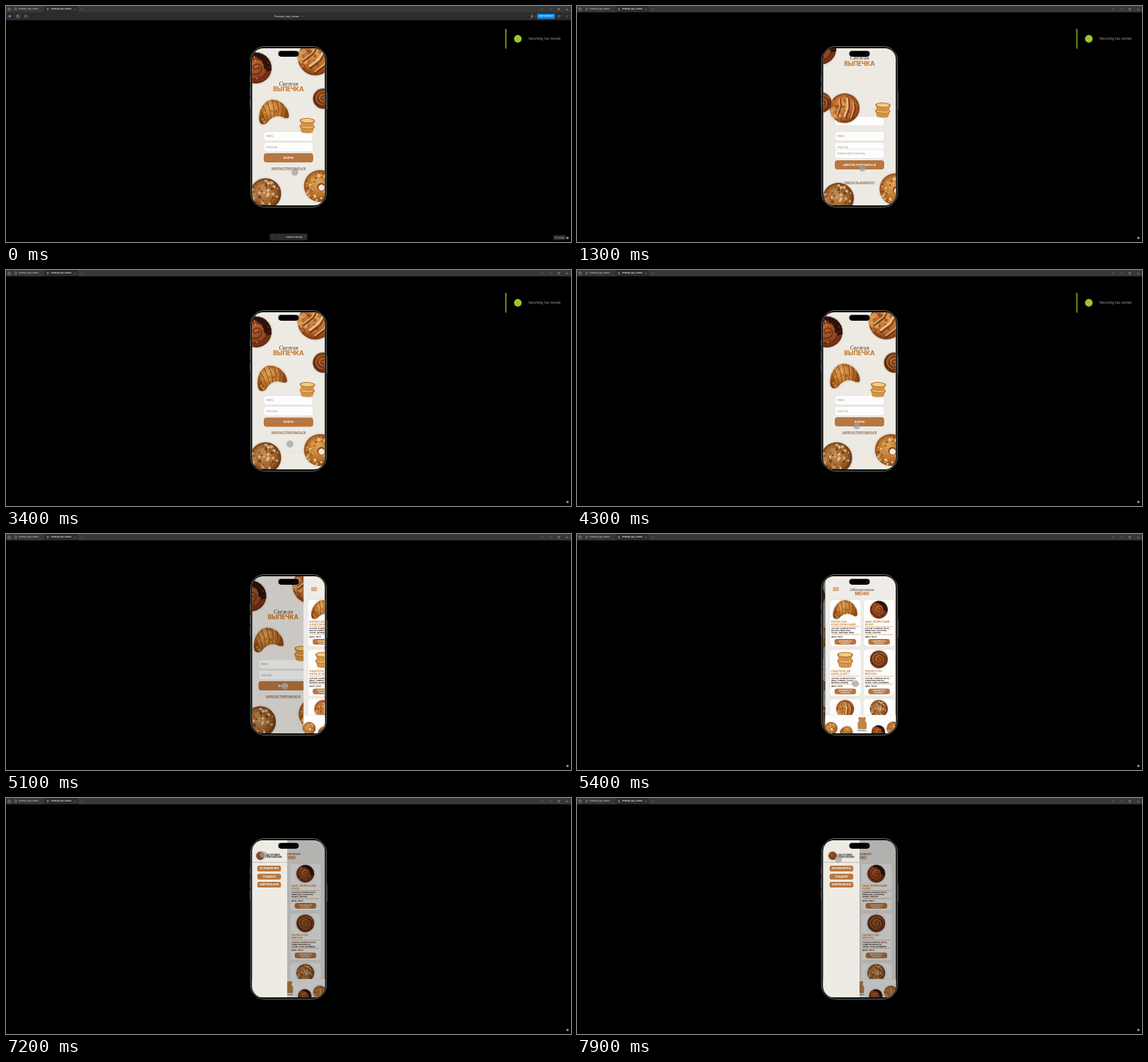
Recreate the animation shown at these times as an HTML page with a canvas. Size 800 px wide and 335 px high, loop 8000 ms.

```html
<!DOCTYPE html>
<html lang="ru">
<head>
<meta charset="utf-8">
<title>Bakery app prototype</title>
<style>
html, body { margin: 0; width: 100%; height: 100%; overflow: hidden; background: #000; }
canvas { display: block; width: 800px; height: 335px; }
</style>
</head>
<body>
<canvas id="stage" width="800" height="335"></canvas>
<script>
const ctx = document.getElementById('stage').getContext('2d');
const LOOP = 8000, TAU = Math.PI * 2;
const ORANGE = '#c67a2f', BUTTON = '#b87640', CREAM = '#edeae4', INK = '#2b211c';
const clamp = v => Math.max(0, Math.min(1, v));
const mix = (a, b, k) => a + (b - a) * k;
const settle = (elapsed, tau) => elapsed <= 0 ? 0 : 1 - Math.exp(-elapsed / tau);
const noise = n => { const v = Math.sin(n * 127.1) * 43758.5453; return v - Math.floor(v); };

function layer(draw, { x = 0, y = 0, scale = 1, turn = 0, alpha = 1 } = {}) {
  if (alpha <= 0) return;
  ctx.save();
  ctx.translate(x, y);
  ctx.rotate(turn);
  ctx.scale(scale, scale);
  ctx.globalAlpha *= alpha;
  draw();
  ctx.restore();
}

function box(x, y, w, h, r, fill, stroke, width = 0.6) {
  ctx.beginPath();
  ctx.roundRect(x, y, w, h, r);
  if (fill) { ctx.fillStyle = fill; ctx.fill(); }
  if (stroke) { ctx.strokeStyle = stroke; ctx.lineWidth = width; ctx.stroke(); }
}

function dot(x, y, r, fill) {
  ctx.beginPath();
  ctx.arc(x, y, r, 0, TAU);
  ctx.fillStyle = fill;
  ctx.fill();
}

function line(color, width, ...pts) {
  ctx.beginPath();
  for (let i = 0; i < pts.length; i += 2) ctx.lineTo(pts[i], pts[i + 1]);
  ctx.strokeStyle = color;
  ctx.lineWidth = width;
  ctx.stroke();
}

// Set at ten times the size and scaled down, so tiny type keeps its spacing.
function text(str, x, y, size, color, { weight = 400, align = 'left', style = '', family = 'Inter, sans-serif' } = {}) {
  layer(() => {
    ctx.font = `${style} ${weight} ${size * 10}px ${family}`;
    ctx.textAlign = align;
    ctx.fillStyle = color;
    ctx.fillText(str, 0, size * 3.6);
  }, { x, y, scale: 0.1 });
}
const centered = (str, x, y, size, color, weight = 700) => text(str, x, y, size, color, { weight, align: 'center' });
const script = (str, x, y, size) =>
  text(str, x, y, size, '#4a3a32', { align: 'center', style: 'italic', family: '"Liberation Serif", serif' });

// Pastries are drawn around the origin with radius 1.
function glow(light, mid, dark) {
  const g = ctx.createRadialGradient(-0.2, -0.3, 0.1, 0, 0, 1.05);
  g.addColorStop(0, light);
  g.addColorStop(0.65, mid);
  g.addColorStop(1, dark);
  return g;
}

function disc(light, mid, dark) {
  ctx.save();
  ctx.shadowColor = 'rgba(70,35,5,.35)';
  ctx.shadowBlur = 3;
  dot(0, 0, 1, glow(light, mid, dark));
  ctx.restore();
}

function crumbs(count, colors, size, inner = 0) {
  for (let i = 0; i < count; i++) {
    const a = noise(i + 1) * TAU, d = inner + (0.92 - inner) * Math.sqrt(noise(i + 60));
    dot(Math.cos(a) * d, Math.sin(a) * d, size * (0.5 + noise(i + 9)), colors[i % colors.length]);
  }
}

function spiral(color, width, turns) {
  ctx.beginPath();
  for (let i = 0; i <= 80; i++) {
    const k = i / 80, a = k * turns * TAU;
    ctx.lineTo(Math.cos(a) * k * 0.9, Math.sin(a) * k * 0.85);
  }
  ctx.strokeStyle = color;
  ctx.lineWidth = width;
  ctx.stroke();
}

function roll() {
  disc('#b8622f', '#94441d', '#5a2410');
  spiral('rgba(70,24,10,.55)', 0.09, 2.6);
  for (let i = 0; i < 9; i++) {
    const a = -1.9 + i * 0.24, d = 0.5 + 0.25 * noise(i + 3);
    line('#2a120d', 0.2, Math.cos(a) * 0.98, Math.sin(a) * 0.98, Math.cos(a + 0.2) * d, Math.sin(a + 0.2) * d);
  }
  crumbs(16, ['#cf7d45', '#4a1d10'], 0.05);
}

function swirl() {
  disc('#b8682f', '#8e461a', '#55240d');
  spiral('#431b0b', 0.13, 2.8);
  layer(() => spiral('rgba(214,134,70,.7)', 0.07, 2.8), { turn: 0.8 });
}

function bread() {
  disc('#dc9a50', '#b8662a', '#74340f');
  crumbs(36, ['rgba(226,166,98,.7)', 'rgba(128,60,18,.6)', 'rgba(192,112,50,.7)'], 0.11);
  for (const [x, w] of [[-0.45, 0.06], [0.08, 0.13], [0.52, 0.06]]) {
    const top = Math.abs(x) * 0.4 - 0.75;
    line('rgba(100,44,12,.7)', w + 0.08, x, top, x + 0.18, -0.1, x + 0.08, 0.65);
    line('#eabf86', w, x - 0.06, top, x + 0.1, -0.1, x + 0.02, 0.6);
  }
}

function nutBun() {
  disc('#c8925a', '#9c6029', '#5e2d10');
  crumbs(64, ['#d3a672', '#7d421a', '#b97d46', '#93592b', '#e0bd90'], 0.08);
}

function bagel() {
  disc('#dda055', '#b9712c', '#84430f');
  crumbs(60, ['#eac586', '#93501b', '#d69d50', '#a9652a'], 0.07, 0.35);
  dot(0.08, 0.06, 0.25, '#8a4a1a');
  dot(0.1, 0.1, 0.19, CREAM);
}

function croissant() {
  ctx.save();
  ctx.beginPath();
  ctx.moveTo(-0.98, 0.62);
  ctx.bezierCurveTo(-1.1, 0.05, -0.65, -0.8, -0.05, -0.8);
  ctx.bezierCurveTo(0.6, -0.8, 1.1, -0.1, 1, 0.48);
  ctx.bezierCurveTo(0.85, 0.65, 0.65, 0.45, 0.4, 0.36);
  ctx.bezierCurveTo(0.1, 0.26, -0.25, 0.4, -0.48, 0.66);
  ctx.bezierCurveTo(-0.65, 0.82, -0.88, 0.8, -0.98, 0.62);
  ctx.shadowColor = 'rgba(70,35,5,.35)';
  ctx.shadowBlur = 3;
  ctx.fillStyle = glow('#dc9c4e', '#b66b24', '#803f11');
  ctx.fill();
  ctx.shadowBlur = 0;
  ctx.clip();
  for (let i = -3; i <= 3; i++) {
    const x = i * 0.28, top = x * x * 0.5 - 0.9;
    line('rgba(110,52,14,.55)', 0.07, x * 1.25, top, x * 1.1 + 0.08, -0.2, x * 0.7, 0.7);
    line('rgba(238,186,112,.45)', 0.08, x * 1.25 + 0.1, top + 0.1, x * 1.1 + 0.16, -0.2);
  }
  crumbs(30, ['rgba(226,164,88,.6)', 'rgba(126,62,18,.5)'], 0.07);
  ctx.restore();
}

function tarts() {
  for (const y of [0.42, -0.3]) {
    ctx.beginPath();
    ctx.moveTo(-0.92, y - 0.25);
    ctx.lineTo(0.92, y - 0.25);
    ctx.lineTo(0.68, y + 0.5);
    ctx.quadraticCurveTo(0, y + 0.7, -0.68, y + 0.5);
    ctx.fillStyle = '#dba254';
    ctx.fill();
    for (let i = -3; i <= 3; i++) line('#b06f30', 0.06, i * 0.25, y, i * 0.2, y + 0.5);
    ctx.beginPath();
    ctx.ellipse(0, y - 0.25, 0.95, 0.32, 0, 0, TAU);
    ctx.fillStyle = '#b9702b';
    ctx.fill();
    ctx.beginPath();
    ctx.ellipse(0, y - 0.25, 0.8, 0.23, 0, 0, TAU);
    ctx.fillStyle = '#f1cd7c';
    ctx.fill();
  }
}

const put = (shape, x, y, scale, turn = 0) => layer(shape, { x, y, scale, turn });

function field(label, y, alpha = 1) {
  layer(() => {
    box(365, y - 6.7, 70, 13.4, 4, '#fdfdfd', '#d9d5d0');
    text(label, 368.5, y, 3.7, '#948d87');
  }, { alpha });
}

function link(str, y, alpha, half) {
  layer(() => {
    centered(str, 400, y, 4.05, '#6a4630', 500);
    line('#6a4630', 0.4, 400 - half, y + 2.2, 400 + half, y + 2.2);
  }, { alpha });
}

// Sign-in turns into sign-up: form rows follow p, fades follow q, pastries and title follow drift.
function signIn(t) {
  const p = t < 3210 ? settle(t - 1245, 55) : 1 - settle(t - 3210, 55);
  const q = Math.min(1, p / 0.632), drift = q * q;
  const move = (shape, x0, y0, x1, y1, r, turn = 0) => put(shape, mix(x0, x1, drift), mix(y0, y1, drift), r, turn);
  box(348, 60, 104, 223, 0, CREAM);

  field('ИМЯ', mix(152, 169.5, p), q);
  field('EMAIL', 184.8);
  field('ПАРОЛЬ', 200.2);
  field('ПОВТОРИТЕ ПАРОЛЬ', mix(200, 215.5, p), q);
  link('ЗАРЕГИСТРИРОВАТЬСЯ', mix(230.5, 225, q), 1 - q, 25);
  const y = mix(215.5, 231, p);
  box(365, y - 6.5, 70, 13, 4, BUTTON);
  layer(() => centered('ВОЙТИ', 400, y, 3.9, '#fff'), { alpha: 1 - q });
  layer(() => centered('ЗАРЕГИСТРИРОВАТЬСЯ', 400, y, 3.8, '#fff'), { alpha: q });
  link('УЖЕ ЕСТЬ АККАУНТ?', mix(258, 246, p), q, 22);

  move(roll, 354, 88, 345, 61, 22);
  move(swirl, 449, 131.5, 346, 137, 14.3);
  put(croissant, mix(378.5, 316.5, q), mix(150, 201, q), 21, -0.12 - q * 2);
  move(tarts, 426.5, 169, 433, 147, 11.5, 0.05);
  move(nutBun, 367.5, 266.5, 370, 273, 22);
  move(bagel, 444.5, 255.5, 451, 260, 22.5);
  move(bread, 438, 74, 379, 145, mix(24.5, 21, drift), mix(0.8, 0.2, drift));

  script('Свежая', 400, mix(110, 73.5, drift), 8);
  centered('ВЫПЕЧКА', 400, mix(118.3, 82, drift), 8.4, ORANGE, 800);
}

const GOODS = [
  [croissant, 17, ['КРУАССАН', 'КЛАССИЧЕСКИЙ'], ['МАСЛО СЛИВОЧНОЕ,', 'САХАР, ДРОЖЖИ, ЯЙЦО'], 180],
  [roll, 12.5, ['НЬЮ-ЙОРКСКИЙ', 'РОЛЛ'], ['КРЕМ-СЫР, САХАРНАЯ', 'ПУДРА, ГЛАЗУРЬ'], 290],
  [tarts, 12, ['ПАШТЕЛЬ ДЕ', 'НАТА (2 ШТ.)'], ['ЯЙЦО, СЛИВКИ, САХАР,', 'МОЛОКО, ВАНИЛЬ'], 270],
  [swirl, 12.5, ['ПАТИССОН-', 'БРЕТОН'], ['СЛИВОЧНОЕ МАСЛО,', 'САХАР, СОЛЬ, КАРАМЕЛЬ'], 250],
  [bread, 12.5], [nutBun, 12.5]
];

function card([shape, size, title, contents, price], i) {
  const x = 354 + (i % 2) * 47.8, y = 93 + (i >> 1) * 70.4;
  box(x, y, 44.5, 67, 5, '#fdfdfd', '#dcd8d2');
  put(shape, x + 22, y + 14.5, size);
  if (!title) return;
  title.forEach((s, n) => text(s, x + 2.3, y + 31.3 + n * 4.2, 4, ORANGE, { weight: 600 }));
  line(ORANGE, 0.5, x + 2.3, y + 38.5, x + 42, y + 38.5);
  ['СОСТАВ: СЛОЁНОЕ ТЕСТО,', ...contents].forEach((s, n) =>
    text(s, x + 2.3, y + 41.2 + n * 3, 2.55, INK, { weight: 700 }));
  line(ORANGE, 0.5, x + 2.3, y + 49.8, x + 42, y + 49.8);
  text(`ЦЕНА: ${price} ₽.`, x + 2.3, y + 53, 2.6, INK, { weight: 700 });
  box(x + 7, y + 56, 30.5, 8, 3.2, BUTTON);
  centered('ДОБАВИТЬ В', x + 22.2, y + 58.6, 2.7, '#fff');
  centered('КОРЗИНУ', x + 22.2, y + 61.6, 2.7, '#fff');
}

function menu() {
  box(348, 60, 104, 223, 0, '#efece7');
  for (const y of [76.2, 78.2, 80.2]) line(ORANGE, 1.1, 358.7, y, 367, y);
  script('Обновленное', 400, 79, 6.2);
  centered('МЕНЮ', 400, 85, 6.1, ORANGE, 800);
  GOODS.forEach(card);
  box(348, 257, 104, 26, 0, '#fdfdfd', '#dcd8d2', 0.5);
  put(bagel, 356, 276, 9);
  put(croissant, 379, 280, 9, 0.5);
  put(roll, 423, 281, 9.5);
  put(bread, 444.5, 276, 9.5);
  for (const [x, turn] of [[397, -0.15], [400, 0], [403, 0.15]])
    layer(() => box(-1.5, -4, 3, 9, 1.5, '#c98a45', '#8f5724', 0.4), { x, y: 264, turn });
  box(393.8, 266.5, 12.6, 10.5, 1.5, '#b98550');
  centered('КОРЗИНА', 400, 279.4, 2.7, INK, 500);
}

function drawer(k) {
  layer(() => box(348, 60, 104, 223, 0, '#000'), { alpha: 0.25 * k });
  layer(() => {
    box(348, 60, 52, 223, 0, '#eeebe5');
    put(swirl, 362, 82, 5.8);
    text('НАСТРОЙКИ', 369.3, 80.4, 3.1, INK, { weight: 700 });
    text('ПРИЛОЖЕНИЯ', 369.3, 83.6, 3.1, INK, { weight: 700 });
    line('#8f8378', 0.5, 348, 91.3, 400, 91.3);
    ['ВСЯ ВЫПЕЧКА', 'СЛАДКОЕ', 'НЕЙТРАЛЬНОЕ'].forEach((s, i) => {
      const y = 100.2 + i * 11.4;
      box(357.7, y - 4.1, 33.5, 8.2, 2.6, BUTTON);
      centered(s, 374.5, y, 3.6, '#fff');
    });
  }, { x: -52 * (1 - k) });
}

// Time, x, y
const POINTER = [
  [0, 409, 236], [100, 409, 236], [700, 404, 230], [1700, 404, 230], [2700, 402, 247], [3400, 402, 247],
  [4300, 396, 221], [4800, 395, 216], [5300, 395, 216], [6300, 364, 88], [6400, 364, 87], [6750, 363, 79],
  [7000, 363, 79], [7700, 370, 87], [8000, 370, 87]
];

function pointer(t) {
  const i = POINTER.findIndex(([time]) => time > t), [t0, x0, y0] = POINTER[i - 1], [t1, x1, y1] = POINTER[i];
  const k = (t - t0) / (t1 - t0), e = k * k * (3 - 2 * k), x = mix(x0, x1, e), y = mix(y0, y1, e);
  dot(x, y, 5.2, 'rgba(120,120,120,.25)');
  dot(x, y, 4.7, 'rgba(165,165,168,.6)');
}

function phone(t) {
  for (const [x, y, h] of [[344.9, 99, 9], [344.9, 115, 13], [344.9, 131, 13], [453.8, 122, 25]])
    box(x, y, 1.5, h, 0.6, '#333837');
  box(346.3, 57.5, 107.4, 228, 20, '#050505', '#626d6a', 1);
  ctx.save();
  ctx.beginPath();
  ctx.roundRect(348.6, 60, 102.8, 223, 15.5);
  ctx.clip();
  const slide = settle(t - 5067, 100);
  if (slide < 0.995) {
    layer(() => signIn(t), { x: -26 * slide });
    layer(() => box(348, 60, 104, 223, 0, '#000'), { alpha: slide * 0.5 });
  }
  if (slide > 0) layer(menu, { x: 103 * (1 - slide) });
  const open = settle(t - 6900, 90);
  if (open > 0) drawer(open);
  pointer(t);
  ctx.restore();
  box(385.5, 63.7, 29, 8.2, 4.1, '#000');
  dot(410.5, 67.8, 1.2, '#151a2c');
}

const FILE = 'Prototype_App_Lerunov';
const chevron = (x, y, color = '#aaa') => line(color, 0.5, x - 1.2, y - 0.6, x, y + 0.6, x + 1.2, y - 0.6);

function tabs() {
  box(0, 0, 800, 9, 0, '#383838');
  box(54, 0, 48, 9, 0, '#2c2c2c');
  box(3, 3, 3.2, 3, 0.8, null, '#bbb', 0.6);
  box(12.5, 3, 2.6, 2.6, 0.6, null, '#bbb', 0.5);
  text(FILE, 18, 4.5, 2.45, '#ddd', { weight: 500 });
  line('#ccc', 0.5, 58.5, 3, 61, 4.5, 58.5, 6, 58.5, 3);
  text(FILE, 64, 4.5, 2.45, '#fff', { weight: 600 });
  centered('×', 97.5, 4.3, 4, '#ccc', 400);
  centered('+', 107.3, 4.3, 4, '#bbb', 400);
  chevron(759, 4.5);
  line('#bbb', 0.5, 769.8, 4.5, 772.2, 4.5);
  box(781.6, 3.3, 2.3, 2.3, 0.2, null, '#bbb', 0.5);
  centered('×', 794.5, 4.3, 4.5, '#ccc', 400);
}

function toolbar() {
  box(0, 9, 800, 11.3, 0, '#2c2c2c');
  dot(5.3, 14.5, 1.7, '#8c6fe0');
  box(15, 12.7, 4, 3.6, 0.6, null, '#bbb', 0.5);
  line('#bbb', 0.5, 16.5, 12.7, 16.5, 16.3);
  box(26.2, 12.8, 3.5, 3.5, 1.7, null, '#bbb', 0.5);
  text(FILE, 380, 14.5, 3.05, '#eee', { weight: 500 });
  chevron(420, 14.5);
  dot(744.5, 12.8, 0.7, '#ccc');
  box(743.7, 14, 1.6, 2.8, 0.8, '#aaa');
  chevron(748.7, 14.5);
  box(752, 11, 25.3, 7.2, 1.6, '#0d8ce8');
  centered('Share prototype', 764.6, 14.5, 2.6, '#fff', 600);
  line('#bbb', 0.5, 781.3, 13.5, 785, 13.5);
  line('#bbb', 0.5, 781.3, 15.5, 785, 15.5);
  line('#bbb', 0.5, 793.2, 16, 796.2, 13);

  box(373.3, 323, 53.5, 9.4, 2.5, '#2c2c2c');
  line('#666', 0.5, 378.5, 326.7, 377.5, 327.8, 378.5, 328.9);
  line('#777', 0.5, 387.5, 326.7, 388.5, 327.8, 387.5, 328.9);
  text('Velora 27 Neo Big', 397, 327.8, 2.6, '#fff', { weight: 500 });
  chevron(422.3, 327.8);
  box(775, 325.3, 17.5, 7, 2, '#2c2c2c');
  box(777.5, 327.5, 2.4, 2.4, 1.2, null, '#ccc', 0.4);
  text('Restart', 781.8, 328.8, 2.5, '#ddd');
}

function toast() {
  box(707, 32.6, 1.5, 27.8, 0, '#86b32a');
  dot(724.7, 46.5, 5.4, '#9cc62c');
  text('Recording has started', 740, 46.4, 4.45, '#a9a9a9', { family: '"Open Sans", sans-serif' });
}

function frame() {
  const t = performance.now() % LOOP;
  ctx.fillStyle = '#000';
  ctx.fillRect(0, 0, 800, 335);
  tabs();
  layer(toolbar, { alpha: 1 - clamp((t - 300) / 200) });
  layer(toast, { alpha: 1 - clamp((t - 4600) / 200) });
  phone(t);
  dot(795, 329.3, 1.8, '#8d918c');
  requestAnimationFrame(frame);
}
frame();
</script>
</body>
</html>
```
